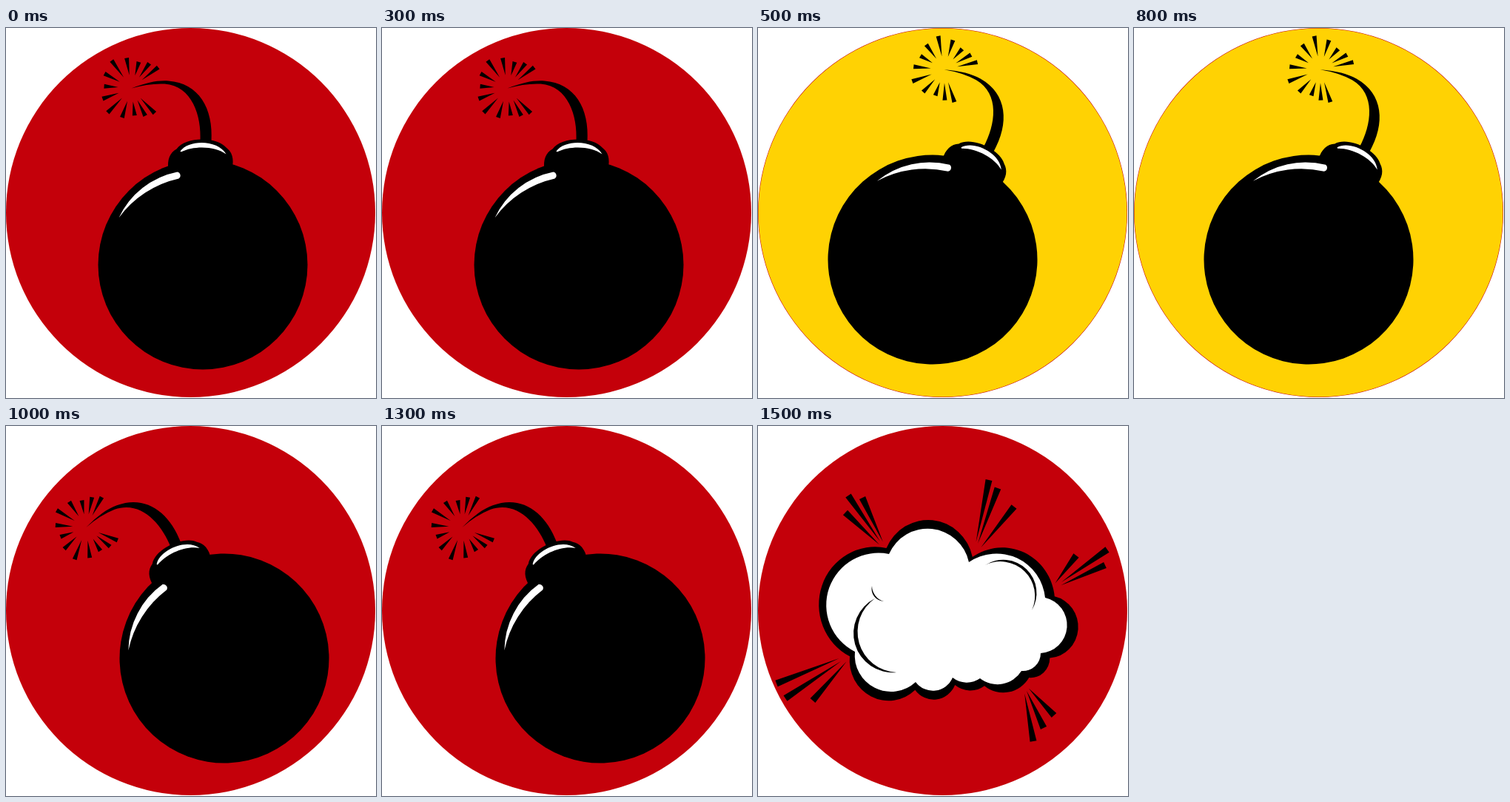
These frames come from a looping animation (500x500 px, 2 s). An HTML page:

```html
<!DOCTYPE html>
<html lang="en">
<head>
<meta charset="utf-8">
<title>Bomb</title>
<style>
  html, body { margin: 0; width: 100%; height: 100%; overflow: hidden; background: #fff; }
  svg { display: block; width: 100vw; height: 100vh; }
</style>
</head>
<body>
<svg viewBox="0 0 500 500">
  <circle cx="249.5" cy="249.5" r="249.5" fill="#c4000a"/>
  <circle id="flash" cx="249.5" cy="249.5" r="249" fill="#ffd203"/>

  <!-- Drawn upright, then moved and tilted as a whole -->
  <g id="bomb">
    <circle cx="265.5" cy="319.5" r="141.5"/>
    <path d="M219 192C217 177 221 168 230 163C242 146 284 146 297 161C305 167 308 176 305 190Z"/>
    <path d="M169 81C190 73 205 70 219 71C260 74 280 108 277 153H262C264 118 251 78 214 75Q193 74 169 81Z"/>
    <path id="sparks"/>
    <g fill="#fff">
      <path d="M235 166C246 150 286 150 297 170C282 159 254 158 236 167Z"/>
      <path d="M152 256A111 111 0 0 1 231 194A5 5 0 0 1 233 203A137 137 0 0 0 152 256Z"/>
    </g>
  </g>

  <g id="blast">
    <!-- The black rim is the same cloud, slightly enlarged -->
    <use href="#cloud" transform="translate(257 247.5) scale(1.077 1.109) translate(-254.5 -247.5)"/>
    <g fill="#fff">
      <path id="cloud" fill="inherit" d="M131 305A70.5 70.5 0 0 1 177 173A57 57 0 0 1 285 184A66 66 0 0 1 388 232A38 38 0 0 1 382 307A24 24 0 0 1 356 331A38 38 0 0 1 300 341A31 31 0 0 1 263 340A29 29 0 0 1 213 346A49 49 0 0 1 131 305Z"/>
    </g>
    <path d="M158 233A53 53 0 0 0 187 333A55 55 0 0 1 158 233Z
      M154 216A17 17 0 0 0 170 237A22 22 0 0 1 154 216Z
      M307 188A45 45 0 0 1 370 249A46.5 46.5 0 0 0 307 188Z"/>
    <path id="rays"/>
  </g>
</svg>
<script>
const $ = id => document.getElementById(id);
const show = (id, on) => $(id).setAttribute('visibility', on ? 'visible' : 'hidden');

// Triangle with its flat side centred on x, y
function wedge(x, y, tipX, tipY, width) {
  const k = width / 2 / Math.hypot(x - tipX, y - tipY);
  const dx = (y - tipY) * k, dy = (tipX - x) * k;
  return `M${x + dx} ${y + dy}L${x - dx} ${y - dy} ${tipX} ${tipY}Z`;
}

// Thirteen uneven sparks, leaving a gap where the fuse enters
function spark(i) {
  const turn = i * Math.PI / 6;
  const angle = (47 + 22.9 * i - 8 * Math.sin(turn) - 3 * Math.sin(2 * turn)) * Math.PI / 180;
  const length = 41.5 + 4.5 * Math.cos(3 * turn);
  const at = r => [169 + r * Math.cos(angle), 81 + r * Math.sin(angle)];
  return wedge(...at(length), ...at(18), 6);
}
$('sparks').setAttribute('d', Array.from({ length: 13 }, (_, i) => spark(i)).join(''));

// Each burst: the point it leaves from, then the ends of its three rays
const bursts = [
  [[165, 156], [118, 117], [122, 94], [141, 97]],
  [[297, 159], [312, 73], [324, 84], [346, 109]],
  [[410, 211], [430, 175], [472, 167], [469, 188]],
  [[363, 358], [372, 426], [386, 408], [400, 391]],
  [[112, 318], [25, 348], [37, 368], [74, 371]]
];
function burst([[x, y], ...ends]) {
  const [midX, midY] = ends[1];
  return ends.map(([ex, ey]) =>
    wedge(ex, ey, x + (ex - midX) * 0.2, y + (ey - midY) * 0.2, 9)).join('');
}
$('rays').setAttribute('d', bursts.map(burst).join(''));

// Body centre and tilt of the bomb in each step
const poses = [[266, 320, 0], [236, 313, 25.5], [295, 314, -24.5]];

function draw(time) {
  const step = Math.floor(time % 2000 / 500);
  show('flash', step === 1);
  show('bomb', step < 3);
  show('blast', step === 3);
  if (step < 3) {
    const [x, y, tilt] = poses[step];
    $('bomb').setAttribute('transform', `translate(${x} ${y}) rotate(${tilt}) translate(-265.5 -319.5)`);
  }
}

const start = performance.now();
function tick() {
  draw(performance.now() - start);
  requestAnimationFrame(tick);
}
tick();
</script>
</body>
</html>
```
